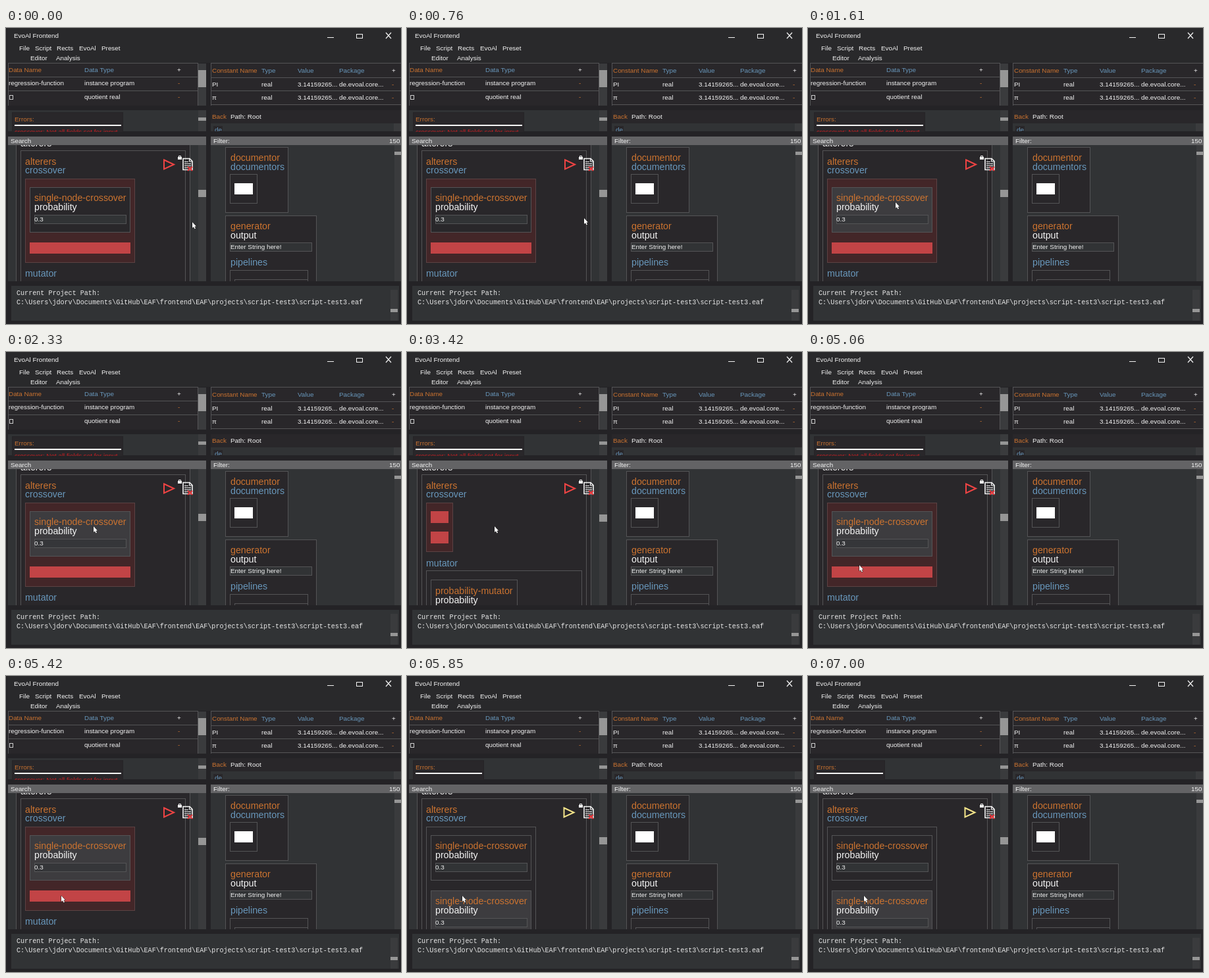
These frames come from a looping animation (600x450 px, 7.03 s). An HTML page with a canvas:

```html
<!DOCTYPE html>
<html lang="en">
<head>
<meta charset="utf-8">
<style>
html, body { margin: 0; width: 600px; height: 450px; overflow: hidden; background: #242326; }
canvas { display: block; }
</style>
</head>
<body>
<canvas id="stage" width="600" height="450"></canvas>
<script>
const ctx = document.getElementById('stage').getContext('2d');
const LOOP = 7030, CUT = 3120, PASTE = 4300, PASTE_AGAIN = 5500;
const ORANGE = '#cb7330', BLUE = '#6897bb', WHITE = '#f4f4f4';
const DARK = '#29272a', PANEL = '#313335', EDGE = '#545456', THUMB = '#969696';
const HOVER = '#3d3c3f', RED = '#c24446', MAROON = '#432628', GAP = '#242326';

// Cursor tip: time, x, y
const path = [
  [0, 283, 295], [760, 269, 289], [1450, 133, 265], [3720, 133, 265],
  [4150, 50, 250], [4500, 50, 250], [5060, 78, 324], [5250, 84, 334],
  [5850, 84, 334], [7000, 85, 334], [LOOP, 85, 334]
];

function fill(x, y, x2, y2, color) {
  ctx.fillStyle = color;
  ctx.fillRect(x, y, x2 - x, y2 - y);
}

function box(x, y, x2, y2, color, edge = EDGE) {
  if (color) fill(x, y, x2, y2, color);
  ctx.strokeStyle = edge;
  ctx.lineWidth = 1;
  ctx.strokeRect(x + .5, y + .5, x2 - x - 1, y2 - y - 1);
}

function text(str, x, y, color = WHITE, size = 9.9, family = '"Liberation Sans", sans-serif') {
  ctx.font = `${size}px ${family}`;
  ctx.fillStyle = color;
  ctx.fillText(str, x, y);
}

const big = (str, x, y, color = WHITE) => text(str, x, y, color, 14.2);
const mono = (str, x, y) => text(str, x, y, '#e8e8e8', 10.08, '"Liberation Mono", monospace');

function clipped(x, y, x2, y2, draw) {
  ctx.save();
  ctx.beginPath();
  ctx.rect(x, y, x2 - x, y2 - y);
  ctx.clip();
  draw();
  ctx.restore();
}

function stroke(points, color, width = 1, close = false) {
  ctx.beginPath();
  points.forEach(([x, y]) => ctx.lineTo(x, y));
  if (close) ctx.closePath();
  ctx.strokeStyle = color;
  ctx.lineWidth = width;
  ctx.stroke();
}

function scrollbar(x, y, x2, y2, from, to) {
  fill(x, y, x2, y2, '#3a3b3d');
  fill(x, from, x2, to, THUMB);
}

function row(cells, xs, y, colors) {
  cells.forEach((cell, i) => text(cell, xs[i], y, colors[i]));
}

function windowFrame() {
  fill(0, 0, 600, 450, GAP);
  fill(2, 0, 600, 53, '#29292b');
  text('EvoAl Frontend', 12, 15);
  row(['File', 'Script', 'Rects', 'EvoAl', 'Preset'], [20, 44, 77, 111, 145], 34, []);
  row(['Editor', 'Analysis'], [37, 76], 49, []);
  stroke([[488, 14.5], [498, 14.5]], WHITE);
  box(532, 9, 542, 16, null, WHITE);
  stroke([[577, 7], [585, 16]], WHITE, 1.2);
  stroke([[585, 7], [577, 16]], WHITE, 1.2);
}

function tables() {
  fill(3, 53, 292, 118, DARK);
  for (const y of [53, 74, 95]) fill(4, y, 291, y + 1, EDGE);
  fill(3, 53, 4, 118, EDGE);
  fill(291, 53, 292, 118, EDGE);
  scrollbar(292, 54, 304, 118, 64, 90);
  const left = [4, 119, 261];
  row(['Data Name', 'Data Type', '+'], [4, 119, 260], 67, [ORANGE, BLUE, WHITE]);
  row(['regression-function', 'instance program', '-'], left, 87, [WHITE, WHITE, ORANGE]);
  row(['', 'quotient real', '-'], left, 108, [WHITE, WHITE, ORANGE]);
  box(5, 102, 11, 109, null, '#cfcfcf');

  fill(311, 53, 600, 118, DARK);
  for (const y of [53, 75, 95, 116]) fill(312, y, 600, y + 1, EDGE);
  fill(311, 53, 312, 118, EDGE);
  const right = [313, 388, 443, 506, 586];
  row(['Constant Name', 'Type', 'Value', 'Package', '+'], right, 68, [ORANGE, BLUE, BLUE, BLUE, WHITE]);
  for (const [name, y] of [['PI', 89], ['π', 109]])
    row([name, 'real', '3.14159265...', 'de.evoal.core...', '-'], right, y, [WHITE, WHITE, WHITE, WHITE, ORANGE]);
}

function errors(ok) {
  fill(3, 125, 292, 157, PANEL);
  scrollbar(292, 125, 304, 157, 136, 141);
  clipped(3, 125, 292, 158, () => {
    const end = ok ? 117 : 178;
    box(9, 128, end, 170, DARK, '#252427');
    text('Errors:', 13, 142, ORANGE);
    fill(13, 147, end - 3, 149, WHITE);
    if (!ok) text('crossover: Not all fields set for input', 13, 161, '#c81e22');
  });
}

function browser() {
  fill(311, 125, 600, 145, DARK);
  fill(311, 145, 589, 157, PANEL);
  fill(589, 145, 600, 157, '#3a3b3d');
  text('Back', 313, 138, ORANGE);
  text('Path: Root', 341, 138);
  clipped(311, 145, 589, 157, () => {
    fill(315, 149, 329, 160, DARK);
    text('de', 317, 158, BLUE);
  });
}

function library() {
  fill(311, 165, 600, 178, '#636365');
  text('Filter:', 315, 175);
  text('150', 582, 175);
  fill(311, 178, 590, 385, PANEL);
  scrollbar(590, 178, 600, 385, 188, 193);
  clipped(311, 178, 590, 385, () => {
    box(333, 181, 429, 281, DARK);
    big('documentor', 341, 202, ORANGE);
    big('documentors', 341, 216, BLUE);
    box(340, 222, 382, 267);
    fill(347, 236, 375, 253, '#fff');
    box(333, 285, 472, 420, DARK);
    big('generator', 341, 306, ORANGE);
    big('output', 341, 320);
    box(340, 326, 465, 340, PANEL);
    text('Enter String here!', 341, 336);
    big('pipelines', 341, 361, BLUE);
    box(340, 368, 459, 420);
    box(347, 382, 459, 420);
  });
}

function node(y, hover) {
  box(36, y, 189, y + 69, hover ? HOVER : DARK);
  big('single-node-crossover', 43, y + 21, ORANGE);
  big('probability', 43, y + 35);
  box(43, y + 42, 183, y + 56, hover ? '#353639' : PANEL);
  text('0.3', 43, y + 52);
}

function slots(t, cursor) {
  if (t < CUT || t >= PASTE && t < PASTE_AGAIN) {
    box(29, 229, 196, 357, MAROON, '#5c4243');
    node(242, t >= PASTE || cursor[0] < 189);
    fill(36, 326, 189, 343, RED);
    big('mutator', 29, 378, BLUE);
  } else if (t < PASTE) {
    box(29, 229, 70, 304, MAROON, '#5c4243');
    fill(36, 242, 63, 260, RED);
    fill(36, 273, 63, 291, RED);
    big('mutator', 29, 326, BLUE);
    box(29, 332, 266, 420);
    box(36, 346, 168, 420);
    big('probability-mutator', 43, 368, ORANGE);
    big('probability', 43, 382);
  } else {
    box(29, 229, 196, 420);
    node(242, false);
    node(326, true);
  }
}

function toolbar(ok) {
  const x = ok ? 238.5 : 240;
  stroke([[x, 200.5], [x + 15, 207.5], [x, 214.5]], ok ? '#f5e58a' : '#f04444', 2, true);
  // Padlock
  fill(261, 196, 267, 200, WHITE);
  stroke([[262.5, 197], [262.5, 194.5], [265.5, 194.5], [265.5, 197]], WHITE);
  // Document with a red cross
  stroke([[269, 198.5], [279, 198.5], [283, 202.5], [283, 215.5], [269, 215.5]], WHITE, 1.6, true);
  stroke([[278.5, 198], [278.5, 203], [283, 203]], WHITE);
  for (const y of [203.5, 206.5, 209.5, 212.5])
    stroke([[271, y], [y < 205 ? 277 : 281, y]], WHITE);
  stroke([[276, 211], [283, 217]], '#ee3035', 1.8);
  stroke([[283, 211], [276, 217]], '#ee3035', 1.8);
}

function editor(t, cursor, ok) {
  fill(3, 165, 304, 178, '#636365');
  text('Search', 7, 175);
  fill(3, 178, 292, 385, PANEL);
  const cut = t >= CUT && t < PASTE;
  const top = ok ? 245 : cut ? 247 : 246;
  scrollbar(292, 178, 304, 385, top, top + 11);
  clipped(3, 178, 292, 385, () => {
    box(15, 150, 280, 420, DARK);
    big('alterers', 22, 180);
    box(22, 186, 273, 420);
    big('alterers', 29, 208, ORANGE);
    big('crossover', 29, 221, BLUE);
    slots(t, cursor);
    toolbar(ok);
  });
}

function output() {
  fill(8, 392, 597, 445, PANEL);
  scrollbar(584, 398, 595, 445, 427, 432);
  mono('Current Project Path:', 16, 406);
  mono('C:\\Users\\jdorv\\Documents\\GitHub\\EAF\\frontend\\EAF\\projects\\script-test3\\script-test3.eaf', 16, 420);
}

function cursorAt(t) {
  const i = path.findIndex(p => p[0] > t);
  const [t0, x0, y0] = path[i - 1], [t1, x1, y1] = path[i];
  const k = (t - t0) / (t1 - t0), e = k * k * (3 - 2 * k);
  return [x0 + (x1 - x0) * e, y0 + (y1 - y0) * e];
}

function pointer([x, y]) {
  const shape = [[0, 0], [0, 9], [2, 7.2], [3.5, 10.5], [5, 9.8], [3.6, 6.7], [6, 6.5]];
  ctx.beginPath();
  shape.forEach(([dx, dy]) => ctx.lineTo(x + dx, y + dy));
  ctx.closePath();
  ctx.strokeStyle = '#111';
  ctx.lineWidth = 1;
  ctx.stroke();
  ctx.fillStyle = '#fff';
  ctx.fill();
}

function draw() {
  const t = performance.now() % LOOP;
  const cursor = cursorAt(t), ok = t >= PASTE_AGAIN;
  windowFrame();
  tables();
  errors(ok);
  browser();
  library();
  editor(t, cursor, ok);
  output();
  pointer(cursor);
  requestAnimationFrame(draw);
}
draw();
</script>
</body>
</html>
```
